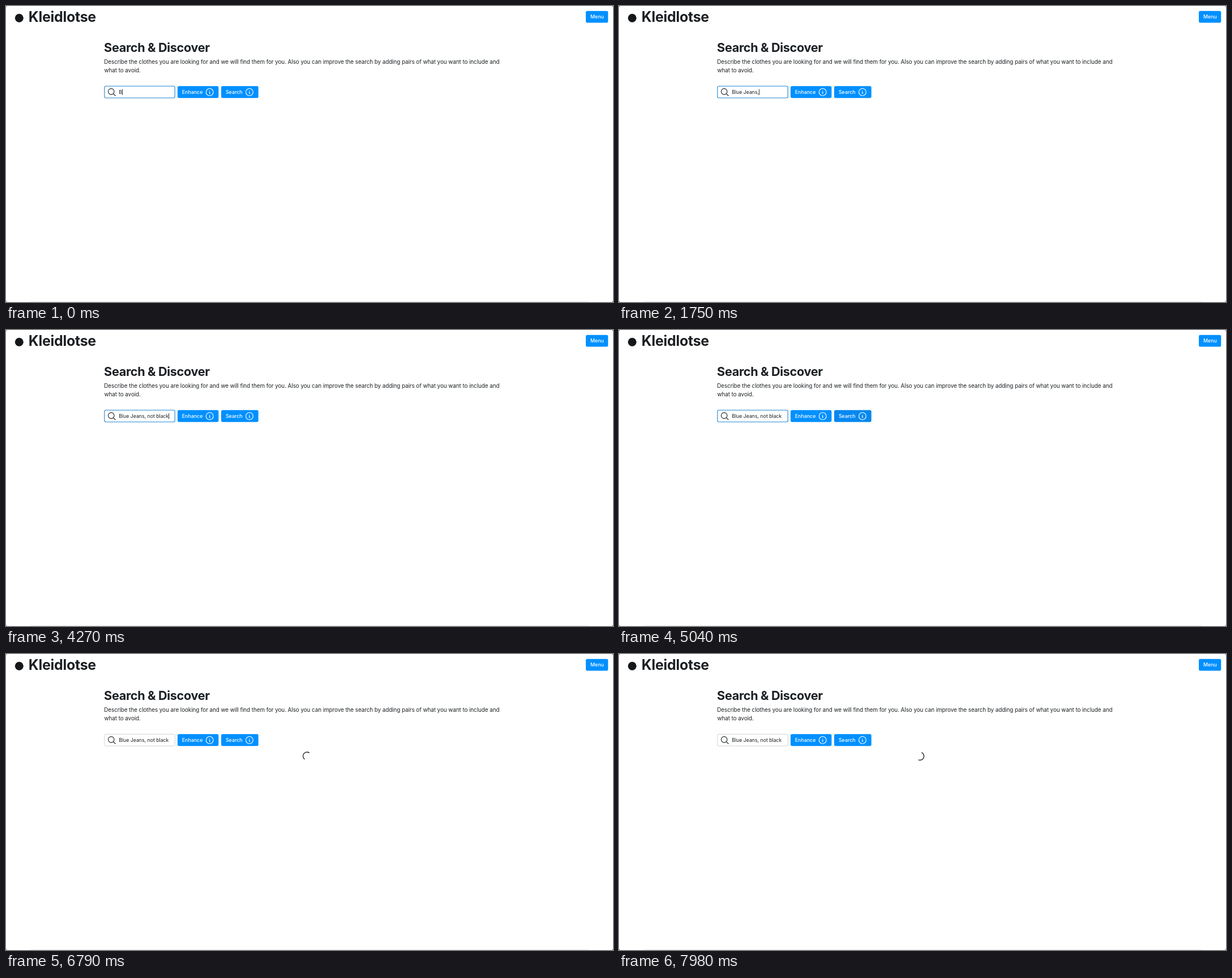
Write an HTML page that moves like this. It is 1072 px wide and 522 px high and loops after 8 s.

```html
<!DOCTYPE html>
<html lang="en">
<head>
<meta charset="utf-8">
<title>Search &amp; Discover</title>
<style>
  html, body { margin: 0; width: 100%; height: 100%; overflow: hidden; background: #666; }
  svg { display: block; width: 1072px; height: 522px; }
  text { font-family: Inter, Roboto, sans-serif; fill: #1c2024; white-space: pre; }
  .brand { font-size: 25px; font-weight: 700; letter-spacing: -.3px; }
  .head { font-size: 21.7px; font-weight: 700; letter-spacing: -.38px; }
  .body { font-size: 9.9px; letter-spacing: -.066px; }
  .field { font-size: 8.8px; letter-spacing: -.04px; }
  .label { font-size: 8.9px; font-weight: 500; fill: #fff; }
  .button { fill: #0090ff; }
  .icon { fill: none; stroke-width: 1.6; stroke-linecap: round; stroke-linejoin: round; }
</style>
</head>
<body>
<svg viewBox="0 0 1072 522">
  <defs>
    <g id="info" class="icon" stroke="#fff" transform="scale(.71)">
      <circle r="9"/>
      <path d="M-.75-.75l.04-.02a.75.75 0 0 1 1.06.85l-.7 2.84a.75.75 0 0 0 1.06.85l.04-.02M0-3.75v.01"/>
    </g>
  </defs>

  <rect width="1072" height="522" rx="3" fill="#fff"/>
  <path d="M43 521.4H1030" stroke="#e9e9eb"/>

  <circle cx="23.3" cy="21.3" r="7.5" fill="#15181a"/>
  <text class="brand" x="39.8" y="27.6">Kleidlotse</text>
  <rect class="button" x="1024" y="8.8" width="39.3" height="20.6" rx="2.6"/>
  <text class="label" x="1031.9" y="22.3">Menu</text>

  <text class="head" x="173.1" y="81.4">Search &amp; Discover</text>
  <text class="body" x="173.3" y="101.8">Describe the clothes you are looking for and we will find them for you. Also you can improve the search by adding pairs of what you want to include and</text>
  <text class="body" x="173.5" y="117.1">what to avoid.</text>

  <rect id="box" x="173.9" y="141.4" width="124.4" height="20.7" rx="2.5" fill="#fff"/>
  <g class="icon" stroke="#1c2024" transform="translate(185.8 150.9) scale(.7)">
    <circle r="7.5"/>
    <path d="M5.3 5.3L10.5 10.5"/>
  </g>
  <text id="query" class="field" x="199.3" y="155.1"></text>
  <rect id="caret" y="146.6" width=".9" height="10.4" fill="#1c2024"/>

  <rect class="button" x="303" y="141.3" width="72.4" height="20.9" rx="2.6"/>
  <text class="label" x="310.7" y="155.1">Enhance</text>
  <use href="#info" x="359.7" y="151.9"/>

  <rect id="search" class="button" x="380" y="141.3" width="65.7" height="20.9" rx="2.6"/>
  <text class="label" x="387.9" y="155.1">Search</text>
  <use href="#info" x="430" y="151.9"/>

  <g transform="translate(531.6 180.1)">
    <path id="spinner" d="M-4.98-4.98A7.04 7.04 0 0 1 4.98 4.98" fill="none" stroke="#1c2024" stroke-width="1.35"/>
  </g>
</svg>
<script>
const LOOP = 8000, STEP = 70;
const PHRASE = 'Blue Jeans, not black';
const PRESS = 6370, RELEASE = 6510, HOVER = 4690;

// Time at which each letter of the phrase appears
const keys = [0, 140, 280, 420, 700, 910, 1050, 1190, 1400, 1540, 1750,
  1960, 2870, 3080, 3220, 3360, 3640, 3780, 3920, 4060, 4270];
// Spans in which the blinking caret is hidden
const blinks = [[2520, 2870], [4760, 5320], [5880, LOOP]];

const el = id => document.getElementById(id);
const box = el('box'), query = el('query'), caret = el('caret');
const search = el('search'), spinner = el('spinner');
const start = performance.now();

function searchColor(t) {
  if (t < HOVER || t >= RELEASE) return '#0090ff';
  return t < PRESS ? '#0588f0' : '#047ddd';
}

function draw(t) {
  const typed = PHRASE.slice(0, keys.filter(k => k <= t).length);
  if (query.textContent !== typed) query.textContent = typed;
  caret.setAttribute('x', 199.3 + query.getComputedTextLength());
  caret.style.opacity = blinks.some(([a, b]) => t >= a && t < b) ? 0 : 1;

  const focused = t < PRESS;
  box.style.stroke = focused ? '#509fdc' : '#c9cad1';
  box.style.strokeWidth = focused ? 1.4 : .8;
  search.style.fill = searchColor(t);

  const ticks = Math.floor((t - RELEASE) / STEP) + 1;
  spinner.style.opacity = ticks > 0 ? 1 : 0;
  spinner.setAttribute('transform', `rotate(${ticks * 52.2})`);
}

function frame() {
  draw((performance.now() - start) % LOOP);
  requestAnimationFrame(frame);
}
draw(0);
requestAnimationFrame(frame);
</script>
</body>
</html>
```
